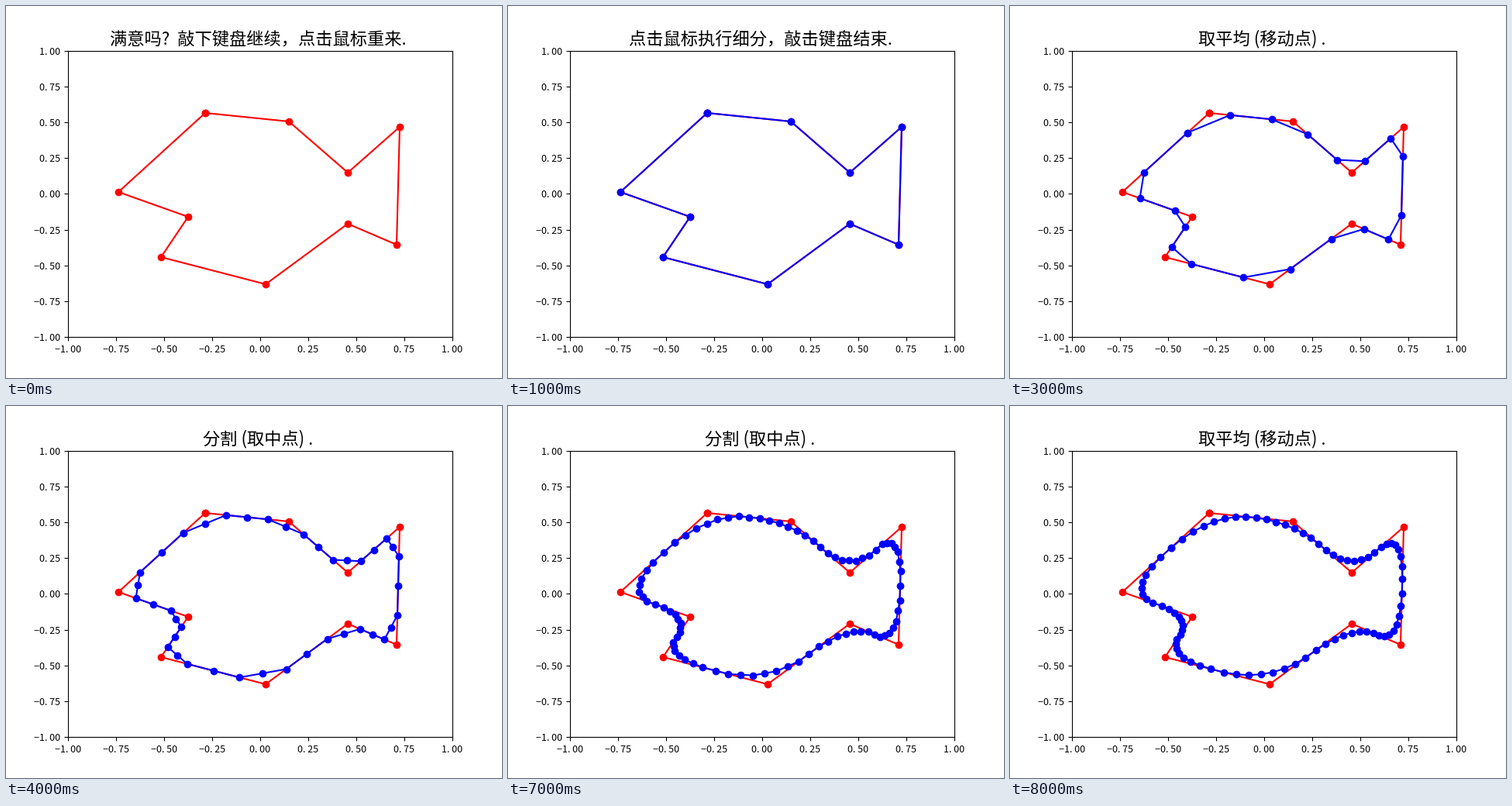
Write a matplotlib script that moves like this. It is 640x480 px and loops after 9 s.

```python
import numpy as np
import matplotlib.pyplot as plt
from matplotlib.animation import FuncAnimation

plt.rcParams["font.family"] = "Noto Sans CJK JP"

WIDTH, HEIGHT, DPI = 640, 480, 100

# Corners of the fish as mouse clicks in screen pixels, y pointing down.
CLICKS = [(257, 138), (145, 240), (235, 272), (200, 324), (335, 359),
          (441, 281), (504, 308), (508, 156), (441, 215), (365, 149)]

READY = "满意吗？敲下键盘继续，点击鼠标重来."
START = "点击鼠标执行细分，敲击键盘结束."
SPLIT = "分割(取中点)."
AVERAGE = "取平均(移动点)."
HOLD = None

# One step per second.
STEPS = [READY, START, SPLIT, AVERAGE, SPLIT, HOLD, AVERAGE, SPLIT, AVERAGE]


def spaced(text):
    """Set punctuation flush left, with room as in a fixed-pitch font."""
    for mark, wide in (("(", " ("), (")", ") "), (".", ". "), ("？", "?  ")):
        text = text.replace(mark, wide)
    return text


def tick_label(value, _):
    return spaced(f"{value:.2f}".replace("-", "\u2212"))


def midpoints(pts):
    return (pts + np.roll(pts, -1, axis=0)) / 2


def split(pts):
    return np.stack([pts, midpoints(pts)], axis=1).reshape(-1, 2)


def closed(pts):
    return np.vstack([pts, pts[:1]]).T


def state(frame):
    """Title and curve after all steps up to the given frame."""
    pts, title = corners, READY
    for step in STEPS[:frame + 1]:
        if step == SPLIT:
            pts = split(pts)
        elif step == AVERAGE:
            pts = midpoints(pts)
        title = step or title
    return title, pts


fig, ax = plt.subplots(figsize=(WIDTH / DPI, HEIGHT / DPI), dpi=DPI)
ax.set(xlim=(-1, 1), ylim=(-1, 1))
for axis in (ax.xaxis, ax.yaxis):
    axis.set_ticks(np.linspace(-1, 1, 9))
    axis.set_major_formatter(tick_label)
ax.tick_params(labelsize=9)

to_data = ax.transData.inverted()
corners = to_data.transform([(x, HEIGHT - y) for x, y in CLICKS])

ax.plot(*closed(corners), "ro-")
curve, = ax.plot([], [], "bo-")
heading = ax.set_title("", fontsize=16)


def update(frame):
    title, pts = state(frame)
    heading.set_text(spaced(title))
    curve.set_data(*closed(pts))
    curve.set_visible(frame > 0)
    return curve, heading


anim = FuncAnimation(fig, update, frames=len(STEPS), interval=1000,
                     repeat=True, repeat_delay=0, blit=False)
plt.show()
```
